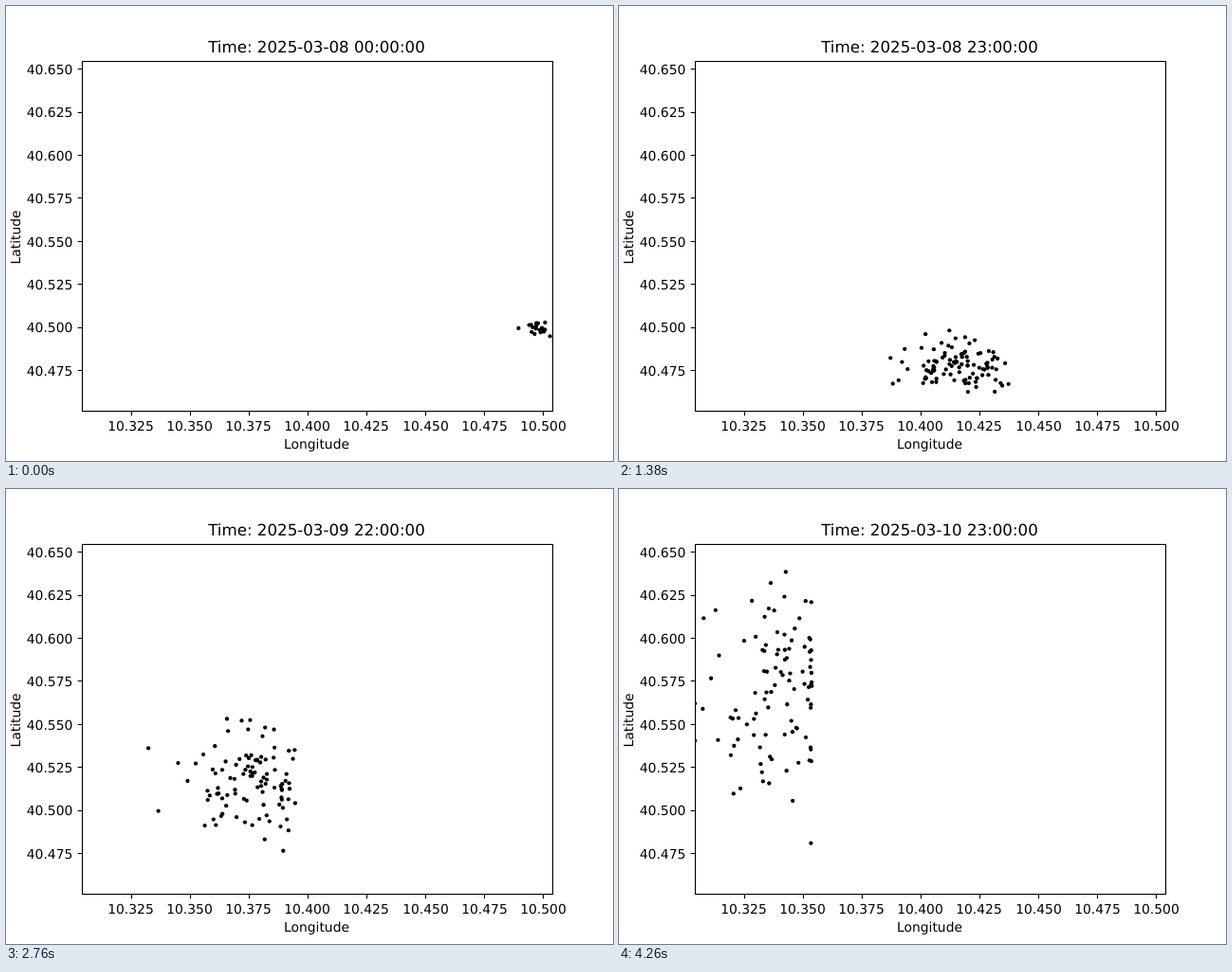
An HTML page for the animation above (4320 ms loop, 640 by 480 pixels).

```html
<!DOCTYPE html>
<html lang="en">
<head>
<meta charset="utf-8">
<title>Drifting particles</title>
<style>
  html, body { margin: 0; width: 100%; height: 100%; overflow: hidden; background: #fff; }
  svg { display: block; width: 640px; height: 480px; }
  text { font: 13.889px "DejaVu Sans", sans-serif; text-anchor: middle; text-rendering: geometricPrecision; }
  .title { font-size: 16.667px; }
  .end { text-anchor: end; }
  .axes { fill: none; stroke: #000; stroke-width: 1.11; }
</style>
</head>
<body>
<svg viewBox="0 0 640 480">
  <defs><clipPath id="plot"><rect x="80" y="57.6" width="496" height="369.6"/></clipPath></defs>
  <rect width="640" height="480" fill="#fff"/>
  <g id="dots" clip-path="url(#plot)"></g>
  <rect class="axes" x="80.5" y="58.5" width="496" height="369"/>
  <g id="ticks"></g>
  <text x="327.5" y="467">Longitude</text>
  <text transform="translate(15 244) rotate(-90)">Latitude</text>
  <text id="title" class="title" x="327.5" y="49"></text>
</svg>
<script>
const HOUR_MS = 60, HOURS = 72, COUNT = 100, PER_HOUR = 20, SETTLED = 12, SKEW = 0.3;
const SOURCE = { x: 560, y: 341, sx: 8, sy: 3.4 };

// Cloud over time: hour, centre x, centre y, spread x, spread y
const CLOUD = [
  [0, 560, 341, 8, 3.4],
  [9, 460, 369, 25, 10],
  [16, 419, 374, 24, 12.5],
  [27, 325, 382, 28, 16],
  [30, 312, 380, 29, 17],
  [39, 270, 315, 30, 25],
  [52, 252, 306, 30, 34],
  [63, 185, 261, 34, 46],
  [71, 168, 222, 31, 57]
];

const $ = id => document.getElementById(id);
const lerp = (a, b, k) => a + (b - a) * k;
const clamp = (v, lo, hi) => Math.min(hi, Math.max(lo, v));

function add(parent, tag, attrs, text = '') {
  const node = document.createElementNS('http://www.w3.org/2000/svg', tag);
  for (const key in attrs) node.setAttribute(key, attrs[key]);
  node.textContent = text;
  return parent.appendChild(node);
}

let seed = 20250;
function random() {
  seed = (seed * 1664525 + 1013904223) % 4294967296;
  return seed / 4294967296;
}
const normal = () => 2 * (random() + random() + random() - 1.5);

// Ticks and labels each snap to whole pixels
function drawTicks() {
  const ticks = $('ticks');
  for (let i = 0; i < 8; i++) {
    const x = 131.6 + 62.1 * i, y = 384.1 - 45.41 * i;
    const tickX = Math.round(x) + 0.5, tickY = Math.round(y) + 0.5;
    add(ticks, 'path', { class: 'axes', d: `M${tickX} 427.5v4.86M80.5 ${tickY}h-4.86` });
    add(ticks, 'text', { x: Math.round(x - 24.6) + 24.5, y: 448 }, (10.325 + 0.025 * i).toFixed(3));
    add(ticks, 'text', { class: 'end', x: 70.3, y: Math.round(y + 5.7) }, (40.475 + 0.025 * i).toFixed(3));
  }
}

const particles = Array.from({ length: COUNT }, (_, i) => ({
  release: Math.floor(i / PER_HOUR),
  startX: normal(), startY: normal(),
  ax: normal(), ay: normal(), bx: normal(), by: normal(),
  turn: 0.01 + 0.02 * random(),
  dot: add($('dots'), 'circle', { r: 2.15 })
}));

function cloudAt(hour) {
  const next = Math.max(1, CLOUD.findIndex(key => key[0] >= hour));
  const a = CLOUD[next - 1], b = CLOUD[next];
  const k = (hour - a[0]) / (b[0] - a[0]);
  return a.slice(1).map((v, i) => lerp(v, b[i + 1], k));
}

function draw(hour) {
  const [cx, cy, sx, sy] = cloudAt(hour);
  const skew = SKEW * hour / HOURS;
  for (const p of particles) {
    const away = clamp((hour - p.release) / (SETTLED - p.release), 0, 1);
    const c = Math.cos(p.turn * hour), s = Math.sin(p.turn * hour);
    const u = p.ax * c + p.bx * s, v = p.ay * c + p.by * s;
    const x = lerp(SOURCE.x + SOURCE.sx * p.startX, cx + sx * (u - skew * (u * u - 1)), away);
    const y = lerp(SOURCE.y + SOURCE.sy * p.startY, cy + sy * v, away);
    p.dot.setAttribute('cx', clamp(x, 80, 576).toFixed(2));
    p.dot.setAttribute('cy', clamp(y, 57.6, 427.2).toFixed(2));
    p.dot.setAttribute('visibility', hour < p.release ? 'hidden' : 'visible');
  }
  const day = String(8 + Math.floor(hour / 24)).padStart(2, '0');
  const clock = String(hour % 24).padStart(2, '0');
  $('title').textContent = `Time: 2025-03-${day} ${clock}:00:00`;
}

drawTicks();
const start = performance.now();
function tick(now) {
  draw(Math.floor(Math.max(0, now - start) / HOUR_MS) % HOURS);
  requestAnimationFrame(tick);
}
draw(0);
requestAnimationFrame(tick);
</script>
</body>
</html>
```
